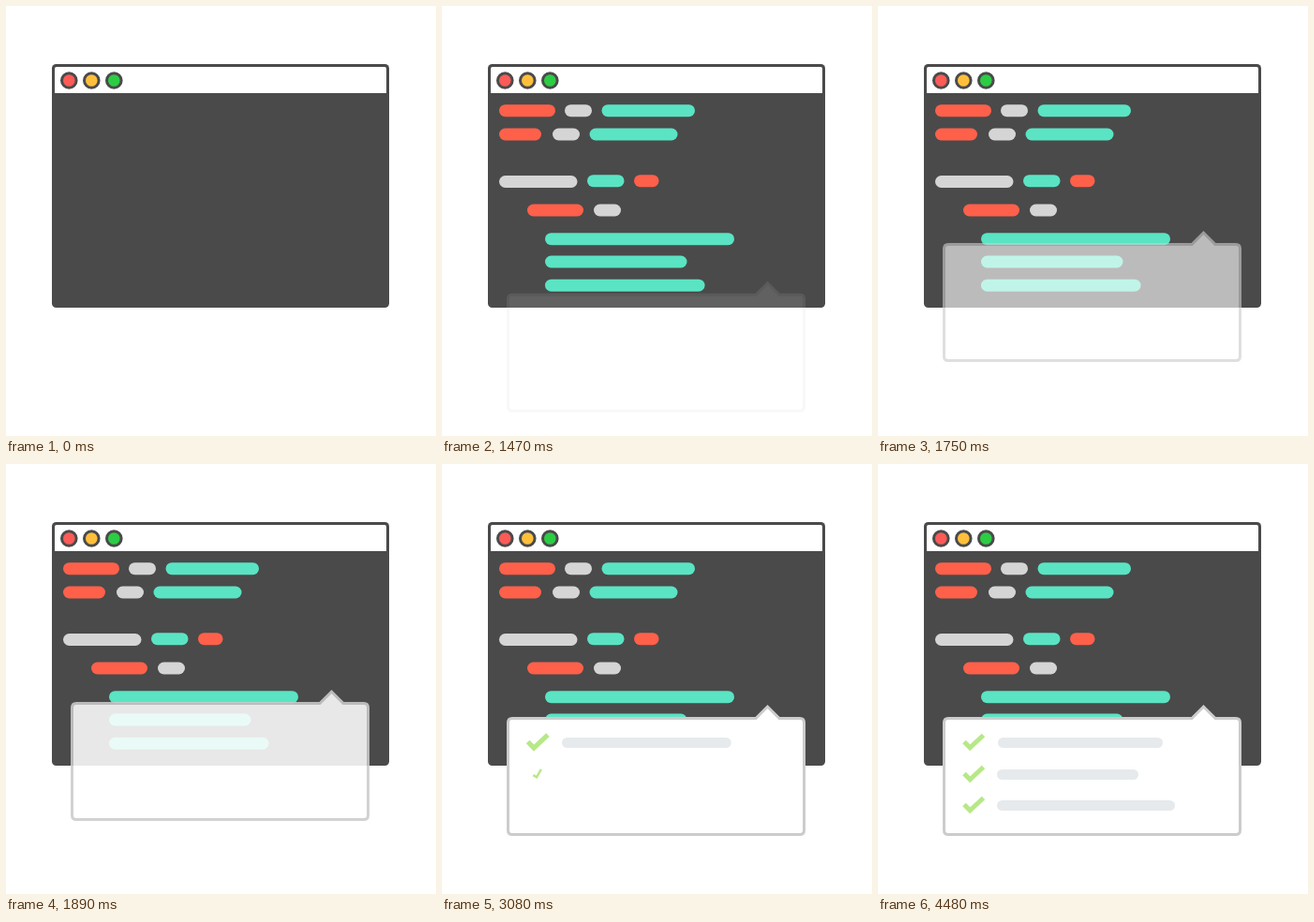
These frames come from a looping animation (459 px wide and 459 px high, 5320 ms). An HTML page:

```html
<!DOCTYPE html>
<html lang="en">
<head>
<meta charset="utf-8">
<title>Code review</title>
<style>
  html, body { margin: 0; height: 100%; overflow: hidden; background: #fff; }
  svg { display: block; width: 100vw; height: 100vh; }
</style>
</head>
<body>
<svg viewBox="0 0 459 459">
  <rect x="49" y="62" width="360" height="260" rx="4.5" fill="#4a4a4a"/>
  <path d="M52 93V67q0-2 2-2H404q2 0 2 2V93z" fill="#fff"/>
  <g stroke="#4a4a4a" stroke-width="3">
    <circle cx="67.3" cy="79.5" r="7.8" fill="#fc5b57"/>
    <circle cx="91.3" cy="79.5" r="7.8" fill="#ffbf3c"/>
    <circle cx="115.3" cy="79.5" r="7.8" fill="#2dcc45"/>
  </g>
  <g id="code"></g>
  <path id="popup" fill="#fff" stroke="#ccc" stroke-width="3"
    d="M75 271.5H335L347.5 259 360 271.5H382q4.500 0 4.500 4.500V391q0 4.500-4.500 4.500H75q-4.500 0-4.500-4.500V276q0-4.500 4.500-4.500z"/>
  <g id="list"></g>
</svg>
<script>
const LOOP = 5320, STEP = 70;
const RED = '#ff604a', GRAY = '#d5d5d5', TEAL = '#5ae4c3';
const code = document.getElementById('code');
const popup = document.getElementById('popup');
const list = document.getElementById('list');

function add(parent, tag, attrs) {
  const el = document.createElementNS('http://www.w3.org/2000/svg', tag);
  for (const name in attrs) el.setAttribute(name, attrs[name]);
  return parent.appendChild(el);
}
const clamp = v => Math.min(1, Math.max(0, v));
const progress = (t, start, length) => clamp((t - start) / length);
const show = (el, on) => el.setAttribute('visibility', on ? 'visible' : 'hidden');

// Code bars in typing order; null is the empty line
const bars = [
  [61, 105.2, 60, RED], [131, 105.2, 29, GRAY], [170.5, 105.2, 99.5, TEAL],
  [61, 130.5, 45, RED], [118, 130.5, 29, GRAY], [157.5, 130.5, 94, TEAL],
  null,
  [61, 181, 83.5, GRAY], [155, 180.2, 39.5, TEAL], [205, 180.2, 26.5, RED],
  [91, 211.5, 60, RED], [162, 211.5, 29, GRAY],
  [110, 242.2, 202, TEAL], [110, 266.5, 151.5, TEAL], [110, 291.7, 170.5, TEAL]
].map(b => b && add(code, 'rect', { x: b[0], y: b[1], width: b[2], height: 13, rx: 6.5, fill: b[3] }));

// Each item: a check pops in, then its bar appears too long and settles
const items = [
  { y: 297, x: 128, width: 176, extra: 14, start: 2310, pop: 2870, settle: 315 },
  { y: 331, x: 127, width: 151, extra: 11, start: 2940, pop: 3640, settle: 210 },
  { y: 364, x: 127, width: 190, extra: 10, start: 3570, pop: 4270, settle: 210 }
];
for (const item of items) {
  item.check = add(list, 'path', { d: 'M-10-.5L-3.8 5.8 10.5-7.5', fill: 'none', stroke: '#b7e887', 'stroke-width': 5 });
  item.bar = add(list, 'rect', { x: item.x, y: item.y - 5, height: 11, rx: 5.5, fill: '#e6eaed' });
}

function popupOffset(t) {
  const rise = 1 - progress(t, 1400, 350);
  const fall = progress(t, 1820, 280);
  return -17 + 84 * rise * rise + 17 * fall * fall;
}

function draw(t) {
  const typed = Math.floor(t * 15 / 700 + 1e-6);
  bars.forEach((bar, i) => bar && show(bar, i < typed));

  popup.setAttribute('opacity', progress(t, 1400, 560));
  popup.setAttribute('transform', `translate(0 ${popupOffset(t)})`);

  for (const { y, width, extra, start, pop, settle, check, bar } of items) {
    const left = 1 - progress(t, start, 560);
    const grow = 1 - left * left;
    const excess = 1 - progress(t, pop, settle);
    const scale = grow * (1 + 0.12 * excess);
    show(check, t > start);
    check.setAttribute('transform', `translate(102 ${y}) rotate(${-30 * (1 - grow)}) scale(${scale})`);
    show(bar, t >= pop);
    bar.setAttribute('width', width + extra * excess);
  }
}

const origin = performance.now();
function tick() {
  const t = (performance.now() - origin) % LOOP;
  draw(Math.floor(t / STEP) * STEP);
  requestAnimationFrame(tick);
}
tick();
</script>
</body>
</html>
```
